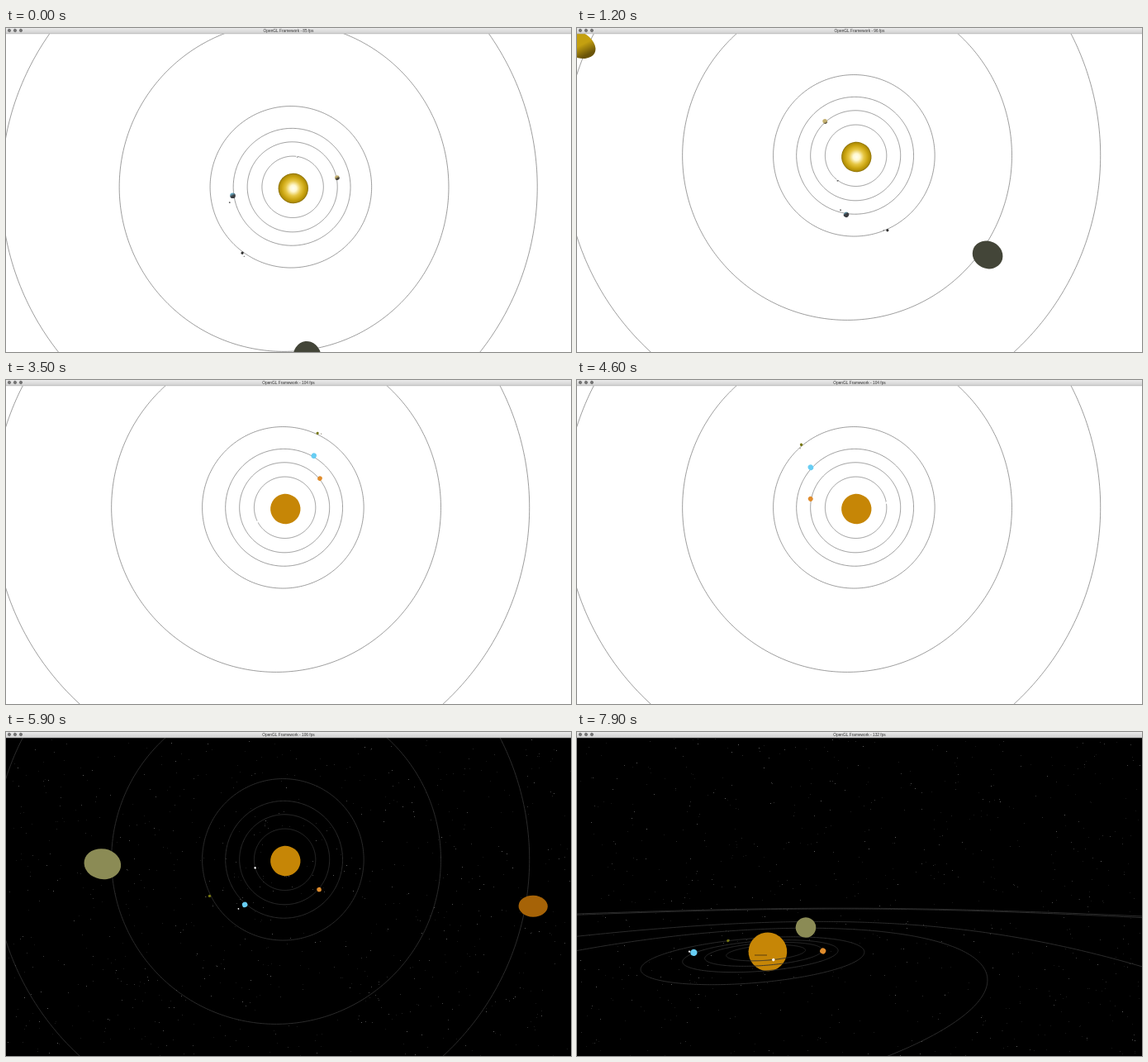
Write an HTML page with a canvas that moves like this. It is 684 px wide and 392 px high and loops after 8000 ms.

```html
<!DOCTYPE html>
<html lang="en">
<head>
<meta charset="utf-8">
<title>Solar system</title>
<style>
html, body { margin: 0; width: 684px; height: 392px; overflow: hidden; background: #fff; }
canvas { display: block; }
</style>
</head>
<body>
<canvas id="stage" width="684" height="392"></canvas>
<script>
const ctx = document.getElementById('stage').getContext('2d');
const W = 684, H = 392, LOOP = 8000, FOCAL = 310, SKEW = 0.000276;
const LIGHT_OFF = 1700, SPACE_ON = 4900, TILT_ON = 6900;

// Orbital progress in degrees of the second planet
const PROGRESS = [[0, 0], [1200, 120.5], [2200, 241], [3500, 388], [5200, 588], [6500, 734], [8000, 903]];
const FPS = [85, 96, 94, 104, 104, 106, 104, 132];
const ORBITS = [37.2, 54.5, 70.9, 97.7, 198.8, 322, 960, 1034];

// dist: orbit radius, size: body radius, start: degrees, rate: relative speed
const PLANETS = [
  { dist: 37.4, size: 1.2, start: 82.1, rate: 1.25, color: '#fff', lit: '#fff', dark: '#333' },
  { dist: 55.4, size: 2.8, start: 11.8, rate: 1, color: '#e08c2c', lit: '#c4b070', dark: '#3c3830' },
  { dist: 72.3, size: 3.2, start: 188.1, rate: 0.6, color: '#67cdf3', lit: '#68a8c0', dark: '#3a3c40',
    moon: { dist: 8.9, size: 0.9, start: 246, rate: 2.11, color: '#fff' } },
  { dist: 99.1, size: 1.6, start: 232.4, rate: 0.5, color: '#77780f', lit: '#77780f', dark: '#333',
    moon: { dist: 4.6, size: 0.6, start: 297, rate: 2, color: '#77705c' } },
  { dist: 208.5, size: 17.3, start: 274.7, rate: 0.4, color: '#8b8b55', lit: '#8b8b55', dark: '#434538' },
  { dist: 333, size: 14.2, start: 116, rate: 0.35, color: '#a66307', lit: '#c4a010', dark: '#6a5408' }
];

const clamp = v => Math.max(0, Math.min(1, v));

function progressAt(t) {
  const i = PROGRESS.findIndex(p => p[0] > t);
  const [t0, a] = PROGRESS[i - 1], [t1, b] = PROGRESS[i];
  return a + (b - a) * (t - t0) / (t1 - t0);
}

function polar(dist, degrees) {
  const a = degrees * Math.PI / 180;
  return [dist * Math.cos(a), dist * Math.sin(a)];
}

// Both cameras map a point of the orbital plane to [screen x, screen y, scale]
function topCamera(t) {
  const pan = 1 - clamp((t - 50) / 850);
  const cx = 338 + 9.5 * pan, cy = 154.3 + 38 * pan;
  return (x, y) => {
    const s = 1 / (1 + SKEW * x);
    return [cx + x * s, cy - y * s, s];
  };
}

function tiltCamera(x, y) {
  const z = 259 - y;
  if (z < 10) return null;
  const s = FOCAL / z;
  return [342 - (x + 92.8) * s, 200 + 55 * s, s * 1.07];
}

function makeStars(seed, count) {
  const random = () => (seed = seed * 16807 % 2147483647) / 2147483647;
  return Array.from({ length: count }, () => [random() * W | 0, 8 + random() * 384 | 0, 22 + random() ** 3 * 75 | 0]);
}
const topStars = makeStars(4711, 800), tiltStars = makeStars(90210, 800);

function drawStars(stars) {
  for (const [x, y, v] of stars) {
    ctx.fillStyle = `rgb(${v},${v},${v})`;
    ctx.fillRect(x, y, 1, 1);
  }
}

function drawOrbits(project, from) {
  for (const r of ORBITS) {
    ctx.beginPath();
    let pen = false;
    for (let a = from; a <= from + 180; a++) {
      const p = project(...polar(r, a));
      if (p) pen ? ctx.lineTo(p[0], p[1]) : ctx.moveTo(p[0], p[1]);
      pen = !!p;
    }
    ctx.stroke();
  }
}

// A wide-angle lens stretches spheres away from the screen centre
function drawBall(x, y, r, fill, stretch) {
  const dx = x - 342, dy = y - 200;
  const k = stretch ? Math.hypot(1, Math.hypot(dx, dy) / 325) : 1;
  ctx.fillStyle = fill;
  ctx.beginPath();
  ctx.ellipse(x, y, r * k, r, Math.atan2(dy, dx), 0, 7);
  ctx.fill();
}

function sunGlow(x, y, r) {
  const g = ctx.createRadialGradient(x, y, 0, x, y, r);
  [[0, '#fffef0'], [0.22, '#fff8d0'], [0.5, '#e6c644'], [0.75, '#ccA612'], [0.92, '#b08e08'], [1, '#846800']]
    .forEach(stop => g.addColorStop(...stop));
  return g;
}

function shade(planet, x, y, r) {
  const k = clamp((230 - y) / 90);
  if (!k) return planet.dark;
  const g = ctx.createLinearGradient(x - r * 0.5, y - r, x + r * 0.5, y + r);
  g.addColorStop(k * 0.6, planet.lit);
  g.addColorStop(Math.min(1, k * 0.6 + 0.4), planet.dark);
  return g;
}

function drawPlanets(project, turn, lit, tilted) {
  for (const p of PLANETS) {
    const [px, py] = polar(p.dist, p.start + p.rate * turn);
    const at = project(px, py);
    if (!at) continue;
    const [x, y, s] = at, r = p.size * s;
    drawBall(x, y, r, lit ? shade(p, x, y, r) : p.color, !tilted);
    if (!p.moon) continue;
    const m = p.moon, [mx, my] = polar(m.dist, m.start + m.rate * turn);
    const [ux, uy, us] = project(px + mx, py + my);
    drawBall(ux, uy, m.size * us, lit ? '#555' : m.color, false);
  }
}

function drawTitleBar(t) {
  const g = ctx.createLinearGradient(0, 0, 0, 7);
  g.addColorStop(0, '#ebebeb');
  g.addColorStop(1, '#d0d0d0');
  ctx.fillStyle = g;
  ctx.fillRect(0, 0, W, 7);
  ctx.fillStyle = '#b4b4b4';
  ctx.fillRect(0, 6.5, W, 0.7);
  for (const x of [4, 11, 18]) drawBall(x, 3, 2.1, '#747474', false);
  ctx.fillStyle = '#333';
  ctx.font = '4.8px "Liberation Sans", Arial, sans-serif';
  ctx.textAlign = 'center';
  ctx.fillText(`OpenGL Framework - ${FPS[t / 1000 | 0]} fps`, 342, 4.9);
}

function draw(t) {
  const lit = t < LIGHT_OFF, space = t >= SPACE_ON, tilted = t >= TILT_ON;
  const project = tilted ? tiltCamera : topCamera(t);
  ctx.fillStyle = space ? '#000' : '#fff';
  ctx.fillRect(0, 0, W, H);
  if (space) drawStars(tilted ? tiltStars : topStars);

  ctx.strokeStyle = space ? '#303030' : '#5c5c5c';
  ctx.lineWidth = space ? 0.9 : 0.6;
  drawOrbits(project, 180);
  const [x, y, s] = project(0, 0);
  const sunX = tilted ? x : x + 0.3, sunY = tilted ? y : y + 1.7, r = 18.2 * s;
  drawBall(sunX, sunY, r, lit ? sunGlow(sunX, sunY, r) : '#c68606', false);
  if (tilted) {
    ctx.fillStyle = '#5a4010';
    ctx.fillRect(215, 269.5, 15, 1);
  }
  drawOrbits(project, 0);
  drawPlanets(project, progressAt(t), lit, tilted);
  drawTitleBar(t);
}

const begin = performance.now();
function tick() {
  draw((performance.now() - begin) % LOOP);
  requestAnimationFrame(tick);
}
tick();
</script>
</body>
</html>
```
